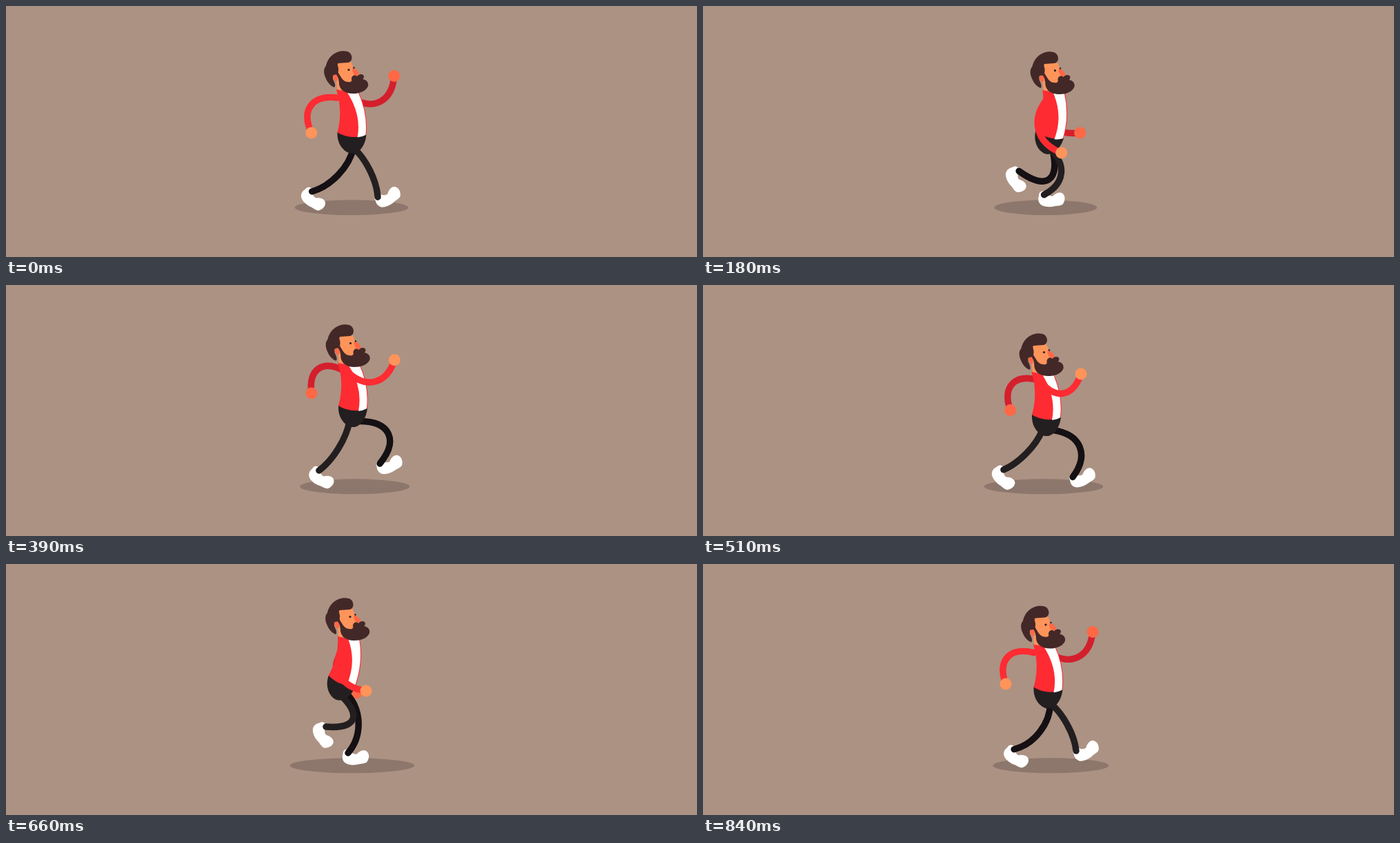
An HTML page for the animation above (870 ms loop, 1000x364 px).

```html
<!DOCTYPE html>
<html lang="en">
<head>
<meta charset="utf-8">
<title>Walk cycle</title>
<style>
  html, body { margin: 0; width: 100%; height: 100%; overflow: hidden; background: #ac9283; }
  svg { display: block; width: 100%; height: 100%; }
  .limb { fill: none; stroke-width: 9.4; stroke-linecap: round; }
  .far.leg { stroke: #141013; }
  .near.leg { stroke: #231f20; }
  .far.arm { stroke: #d41f2d; }
  .near.arm { stroke: #ff2b32; }
  .far.hand { fill: #ff6846; }
  .near.hand { fill: #ff945a; }
  .shoe { fill: #fff; }
  .dark { fill: #432828; }
  .skin { fill: #ff945a; }
  .blush { fill: #ff6846; }
</style>
</head>
<body>
<svg viewBox="0 0 1000 364">
  <defs>
    <path id="shoe" class="shoe" d="M-7 2C-8-4-2-7 2-4C5 0 9 2 13 1C17-4 24-7 28-3C32 1 31 8 28 12C24 15 20 14 15 16C7 18 0 17-4 14C-8 10-8 6-7 2Z"/>
  </defs>
  <ellipse id="shadow" cy="292.3" ry="11" fill="#8d776c"/>
  <path id="farArm" class="limb far arm"/>
  <circle id="farHand" class="far hand" r="8.5"/>
  <use id="farShoe" href="#shoe"/>
  <path id="farLeg" class="limb far leg"/>
  <use id="nearShoe" href="#shoe"/>
  <path id="nearLeg" class="limb near leg"/>
  <path id="pants" fill="#231f20" d="M-21-1C-21 18-8 29 2 29C12 29 21 16 21 0Z"/>
  <g id="neck"><path class="skin" d="M478 108H485V127H480Z"/></g>
  <path id="jacket" fill="#ff2b32"/>
  <path id="shirt" fill="#fff"/>
  <g id="head">
    <path class="skin" d="M480 82L498 80Q502 84 502 90L510 96L506 112L485 116L479 104Z"/>
    <path class="dark" d="M481 94C482 88 478 85 481 83L495 82C503 81 502 68 494 66C483 63 467 69 463 87C459 91 460 98 462 103C465 111 470 116 475 118C478 116 475 110 473 106L473 101C475 99 479 100 480 100Z"/>
    <path class="blush" d="M473 102C475 99 479 99 481 101L479 109C476 110 474 107 473 102Z"/>
    <path class="blush" d="M501 91C505 89 511 95 511 99Q509 102 506 101Q501 98 501 91Z"/>
    <path class="dark" d="M477 92C483 97 485 109 494 110C499 111 501 109 500 106C500 101 505 99 508 102C511 98 517 98 518 102Q518 105 516 106C522 107 525 111 524 116C521 124 511 127 502 127C490 127 483 121 482 113C482 106 480 101 477 98Z"/>
    <circle cx="496" cy="92.5" r="1.6" fill="#231f20"/>
    <circle cx="503.5" cy="89.5" r="1.2" fill="#231f20"/>
  </g>
  <path id="nearArm" class="limb near arm"/>
  <circle id="nearHand" class="near hand" r="8.5"/>
</svg>
<script>
const LOOP = 870, STEP = 30, TURN = 2 * Math.PI;
const el = id => document.getElementById(id);
const set = (id, attrs) => {
  for (const k in attrs) el(id).setAttribute(k, attrs[k]);
};

// time, head x, head y, lean in degrees
const bodyKeys = [
  [0, 0, 0, 4], [90, 13.5, 9.5, 20], [270, 10.5, -10, 9],
  [330, 7, -13, 6], [390, 2.5, -8, 5], [510, -2.5, 5, 5],
  [660, 2, -16, 20], [720, 4, -24, 14], [840, 0, -4.5, 5]
];
// One step, shared by both legs: time, ankle x, ankle y, shoe angle
const stepKeys = [
  [0, 538, 277, -25], [90, 520, 282, -2], [172, 495, 274, 3],
  [270, 484, 274, 20], [390, 453, 269, 36], [530, 435, 266, 52],
  [660, 463, 236, 64], [713, 490, 242, 40], [796, 541, 259, -18],
  [840, 540, 271, -25]
];
// One swing, shared by both arms: time, hand x, hand y, relative to the head
const swingKeys = [
  [0, 442, 184], [90, 451.5, 198.5], [172, 501, 213], [270, 545.5, 179],
  [400, 560, 114], [510, 549.5, 124], [551, 546, 148], [660, 519, 200],
  [713, 453.5, 200], [796, 435.5, 175]
];

const sides = {
  near: { hip: -1, legLength: 79, shoulder: 485, reach: [0, 0], lag: () => 0 },
  // the far side walks about half a loop later, with a slight limp
  far: {
    hip: 7, legLength: 89, shoulder: 494, reach: [4, -10],
    lag: t => 452 - 45 * Math.cos((t - 135) / LOOP * TURN)
  }
};

// Smooth cyclic interpolation through a track's keys
function sample(track, time) {
  const t = (time + LOOP) % LOOP, n = track.length;
  const key = i => {
    const k = track[(i + n) % n];
    return [k[0] + LOOP * Math.floor(i / n), k];
  };
  let i = n - 1;
  while (track[i][0] > t) i--;
  const [[t0, a], [t1, b], [t2, c], [t3, d]] = [-1, 0, 1, 2].map(j => key(i + j));
  const h = t2 - t1, u = (t - t1) / h, v = 1 - u;
  return b.slice(1).map((p, j) => {
    const q = c[j + 1];
    const m1 = (q - a[j + 1]) / (t2 - t0) * h;
    const m2 = (d[j + 1] - p) / (t3 - t1) * h;
    return (1 + 2 * u) * v * v * p + u * v * v * m1 + u * u * (3 - 2 * u) * q - u * u * v * m2;
  });
}

// Rubber-hose limb from p to q; a positive bulge bends forward
function hose([x, y], [qx, qy], bulge) {
  const dx = qx - x, dy = qy - y, k = bulge * 4 / 3 / Math.hypot(dx, dy);
  const at = f => [x + dx * f + dy * k, y + dy * f - dx * k];
  return `M${x} ${y}C${at(0.28)} ${at(0.72)} ${qx} ${qy}`;
}

function drawLeg(name, t, pelvis) {
  const side = sides[name];
  const [x, y, angle] = sample(stepKeys, t - side.lag(t));
  const hip = [pelvis.x + side.hip + 0.08 * (x - pelvis.x), pelvis.y + 20.5];
  // the leg keeps its length, so a shorter span bends the knee more
  const slack = side.legLength ** 2 - (x - hip[0]) ** 2 - (y - hip[1]) ** 2;
  const bulge = Math.hypot(7, Math.sqrt(Math.max(0, slack)) / 2);
  const shift = 5 * Math.sin(angle / 360 * TURN);
  set(name + "Leg", { d: hose(hip, [x, y], bulge) });
  set(name + "Shoe", { transform: `translate(${x - shift} ${y}) rotate(${angle})` });
}

function drawArm(name, t, head) {
  const side = sides[name];
  const [sx, sy] = sample(swingKeys, t - side.lag(t));
  const x = sx + side.reach[0] + head.x, y = sy + side.reach[1] + head.y;
  const shoulder = [side.shoulder + head.x + 0.1 * (sx - 500), 133 + head.y];
  set(name + "Arm", { d: hose(shoulder, [x, y], -24) });
  set(name + "Hand", { cx: x, cy: y });
}

function drawBody(head, pelvis, lean) {
  const r = lean / 360 * TURN, cos = Math.cos(r), sin = Math.sin(r);
  const top = (x, y) => [x + head.x, y + head.y];
  const hip = (x, y) => [pelvis.x + x * cos - y * sin, pelvis.y + x * sin + y * cos];
  // control point of a seam that bulges to the right
  const bend = (p, q, k) => [(p[0] + q[0]) / 2 + k, (p[1] + q[1]) / 2];

  const back = top(478, 121), open = top(493, 124), front = top(510, 124), chest = top(509, 124);
  const hemL = hip(-21, 0), hemM = hip(8.5, 5), hemR = hip(21, 0), hemW = hip(20, 0.5);

  set("jacket", { d: `M${back}L${open}L${front}Q${bend(front, hemR, 9)} ${hemR}` +
    `Q${hip(0, 10)} ${hemL}Q${bend(back, hemL, 9)} ${back}Z` });
  set("shirt", { d: `M${open}L${chest}Q${bend(chest, hemW, 9)} ${hemW}` +
    `Q${hip(15, 4)} ${hemM}Q${bend(open, hemM, 14)} ${open}Z` });
  set("pants", { transform: `translate(${pelvis.x} ${pelvis.y}) rotate(${lean})` });
  for (const id of ["head", "neck"]) set(id, { transform: `translate(${head.x} ${head.y})` });
}

function draw(now) {
  const t = Math.floor((now % LOOP) / STEP) * STEP, a = t / LOOP * TURN;
  const [x, y, lean] = sample(bodyKeys, t);
  const head = { x, y }, pelvis = { x: x + 504.5 - lean, y: y + 185 };
  drawBody(head, pelvis, lean);
  for (const name in sides) {
    drawLeg(name, t, pelvis);
    drawArm(name, t, head);
  }
  set("shadow", { cx: 500 - 8 * Math.sin(2 * a), rx: 82 - 8 * Math.sin(a) });
}

const start = performance.now();
function tick() {
  draw(performance.now() - start);
  requestAnimationFrame(tick);
}
tick();
</script>
</body>
</html>
```
